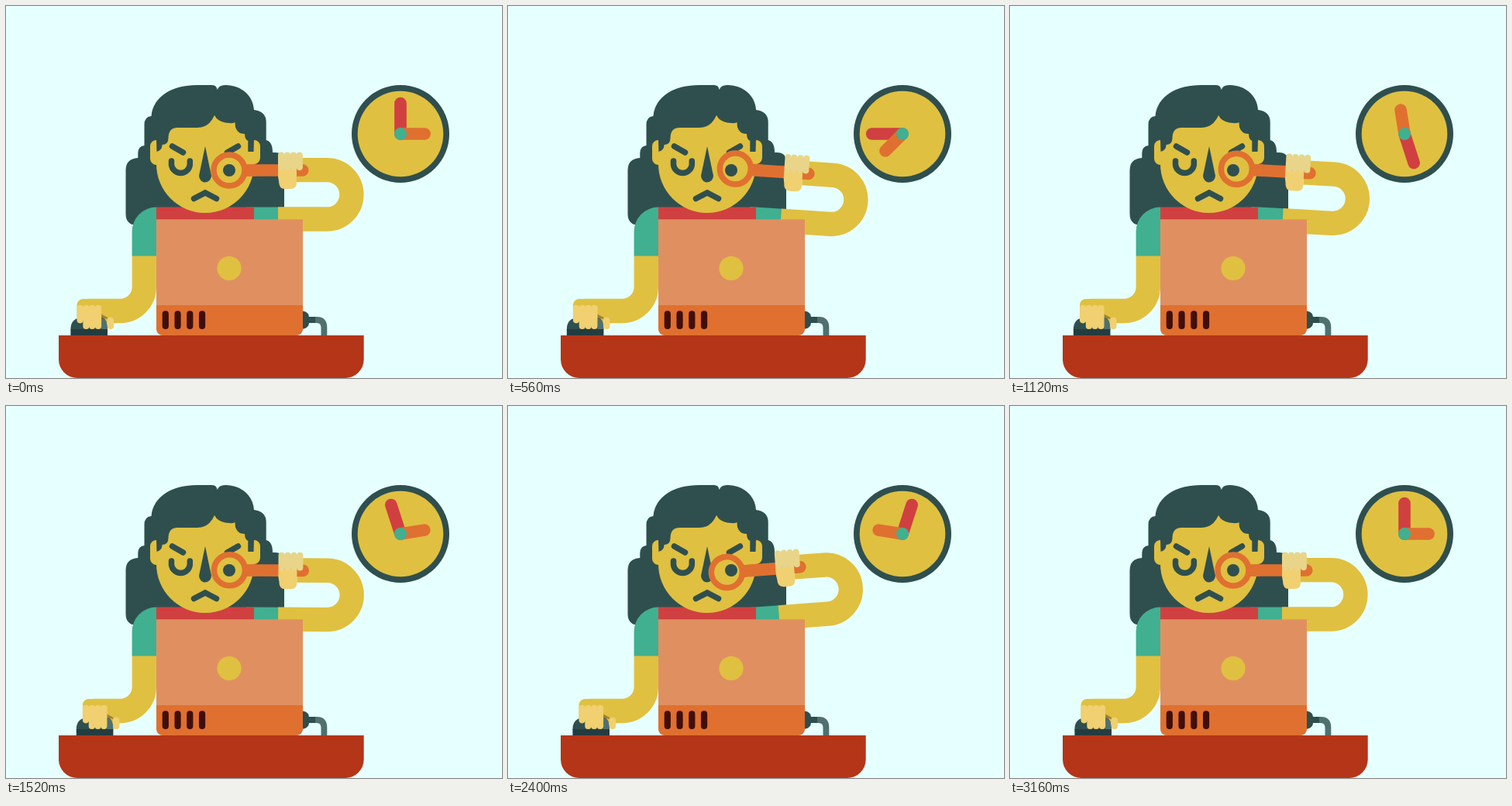
An HTML page that plays this animation: 640 by 480 pixels, repeating every 3.2 s.

```html
<!DOCTYPE html>
<html lang="en">
<head>
<meta charset="utf-8">
<title>Desk detective</title>
<style>
  html, body { margin: 0; width: 100%; height: 100%; overflow: hidden; background: #e6ffff; }
  svg { display: block; width: 640px; height: 480px; }
  .dark { fill: #2f4f4f; }
  .skin { fill: #e0c040; }
  .hand { fill: #f0d070; }
  .green { fill: #40b090; }
  .red { fill: #d04040; }
  .orange { fill: #e07030; }
  .line { fill: none; stroke: #2f4f4f; stroke-width: 7.5; stroke-linecap: round; }
  .limb { fill: none; stroke: #e0c040; stroke-width: 31.3; }
  .lens { fill: none; stroke: #e07030; stroke-linecap: round; }
</style>
</head>
<body>
<svg viewBox="0 0 640 480" xmlns="http://www.w3.org/2000/svg">
  <rect width="640" height="480" fill="#e6ffff"/>

  <g id="clock">
    <circle class="dark" cx="509" cy="165" r="63"/>
    <circle class="skin" cx="509" cy="165" r="55.3"/>
    <g stroke-width="15.6" stroke-linecap="round">
      <path id="minute" d="M509 165V125.6" stroke="#d04040"/>
      <path id="hour" d="M509 165V133.8" stroke="#e07030"/>
    </g>
    <circle class="green" cx="509" cy="165" r="8"/>
  </g>

  <path class="dark" d="M154.5 268V212Q154.5 197 170.3 196V190Q170.3 181 178.5 180V153Q178.5 143 187.5 142
    C190 116 215 102 247 102H266Q271.5 102 272.7 108Q274.5 102 283 102C304 102 319 116 320 134
    Q335.7 136 335.7 150V173Q344 175 344 189H347Q359 189 359 201V283H170Q154.5 283 154.5 268Z"/>

  <g id="reachSleeve">
    <rect class="green" x="310" y="259.5" width="42" height="31"/>
    <path class="limb" d="M351 275H414.3A31.6 31.6 0 0 0 414.3 211.7H375"/>
  </g>

  <rect class="red" x="194" y="259.5" width="126" height="20"/>
  <path class="green" d="M194 259.5A31.5 31.5 0 0 0 162.6 291V323H194Z"/>

  <g id="face">
    <path class="skin" d="M194 173A8 8 0 0 0 186 181V197A8 8 0 0 0 195 205Z"/>
    <path class="skin" d="M320 173A8 8 0 0 1 328 181V196A8 8 0 0 1 319 204Z"/>
    <path class="skin" d="M194 188Q201 187 201.7 179Q209 179 209.5 171Q209.5 157 221 157H247
      Q262 157 269 141Q273 149 283 150.5Q294 152 295.6 150Q295 160 302 164Q305 165 308 165
      Q308 172 312.3 174V188H320V204A63 63 0 0 1 194 204Z"/>
    <path class="line" d="M214.5 181L228.5 189M285.5 189L299.5 181"/>
    <path class="line" d="M213.5 200V205A12 12 0 0 0 237.3 205V200"/>
    <path class="line" d="M242.5 248.5L257 241L271.5 248.5"/>
    <path class="dark" d="M257 181L265 219A8 8.5 0 0 1 249 219Z"/>
    <circle class="dark" cx="288" cy="212" r="8"/>
  </g>

  <g id="reachHand">
    <circle class="lens" cx="288" cy="212" r="20" stroke-width="7.6"/>
    <path class="lens" d="M318 212H382.7" stroke-width="15.7"/>
    <rect class="orange" x="308.5" y="204.2" width="14" height="15.7"/>
    <path class="hand" d="M351 210H375V228Q375 236 367 236H360Q352 236 352 226L351 220Z"/>
    <g id="gripFingers" fill="#e8d58a"></g>
  </g>

  <path class="limb" id="forearm"/>
  <g id="mouse">
    <path class="skin" d="M107 377.9H99.5A8 8 0 0 0 91.5 386V402H107Z"/>
    <path class="dark" d="M83.4 417.5Q83.4 402 99 402H125Q131 405 131 417.5Z"/>
    <path fill="#507070" d="M123 417V402Q131 404 131 417Z"/>
    <path fill="#a08030" d="M122 397L131 402V404L123 402Z"/>
    <rect x="83.4" y="417" width="47.6" height="8" fill="#243c40"/>
    <rect class="hand" x="130.6" y="401.7" width="8.4" height="15.3" rx="4"/>
    <g id="mouseFingers" class="hand"></g>
  </g>

  <g id="laptop">
    <rect x="194" y="275.3" width="189" height="112" fill="#e09060"/>
    <path class="orange" d="M194 386H383V417A8 8 0 0 1 375 425H202A8 8 0 0 1 194 417Z"/>
    <circle class="skin" cx="288" cy="338.5" r="15.6"/>
    <g id="vents" fill="#400f0c"></g>
    <path d="M396 405H401Q410.4 405 410.4 415V425" fill="none" stroke="#507070" stroke-width="7.8"/>
    <path class="dark" d="M383 393.5Q391 395 391 401H399V409H391Q391 415 383 416.8Z"/>
  </g>
  <path d="M68 425H461.7V456A24 24 0 0 1 437.7 480H92A24 24 0 0 1 68 456Z" fill="#b53518"/>
</svg>

<script>
const FRAME = 40, COUNT = 80;
const $ = id => document.getElementById(id);

function pills(id, x, y, gap, width, heights) {
  const r = width / 2;
  $(id).innerHTML = heights.map((h, i) =>
    `<rect x="${x + i * gap}" y="${y}" width="${width}" height="${h}" rx="${r}"/>`).join('');
}
pills('vents', 201.7, 393.3, 15.75, 8.2, [23.7, 23.7, 23.7, 23.7]);
pills('gripFingers', 351, 188.5, 7.9, 8.2, [23.7, 23.7, 23.7, 23.7]);
pills('mouseFingers', 91.5, 385.7, 7.8, 8.2, [23.7, 31.3, 31.3, 31.3]);
// Solid middles close the gaps between neighbouring fingers.
$('gripFingers').innerHTML += '<rect x="352" y="192" width="30" height="17"/>';
$('mouseFingers').innerHTML += '<rect x="93" y="389" width="29" height="17"/><rect x="101" y="400" width="21" height="14"/>';

const smooth = u => u * u * (3 - 2 * u);
const mix = (a, b, u) => a + (b - a) * u;

function mouseShift(s) {
  if (s < 20) return -8.2 * Math.sin(s / 20 * Math.PI / 2);
  if (s < 40) return mix(-8.2, 7.5, smooth((s - 20) / 20));
  if (s < 60) return mix(7.5, 0, smooth((s - 40) / 20));
  return 0;
}

function turn(id, angle, x, y) {
  $(id).setAttribute('transform', `rotate(${angle} ${x} ${y})`);
}

function pose(time) {
  const frame = Math.floor(time / FRAME + 0.001) % COUNT;
  const step = frame ? frame + 1 : 0; // the opening beat skips one step
  turn('minute', step * 18, 509, 165);
  turn('hour', 90 + step * 9, 509, 165);

  const sway = 4.2 * Math.sin(step / COUNT * 2 * Math.PI);
  turn('reachSleeve', sway, 320, 290);
  turn('reachHand', sway, 320, 290);

  const dx = mouseShift(step);
  $('mouse').setAttribute('transform', `translate(${dx} 0)`);
  $('forearm').setAttribute('d', `M178.3 322.5V362.5A31 31 0 0 1 147.3 393.5H${105 + dx}`);
}

const start = performance.now();
function tick() {
  pose(performance.now() - start);
  requestAnimationFrame(tick);
}
tick();
</script>
</body>
</html>
```
